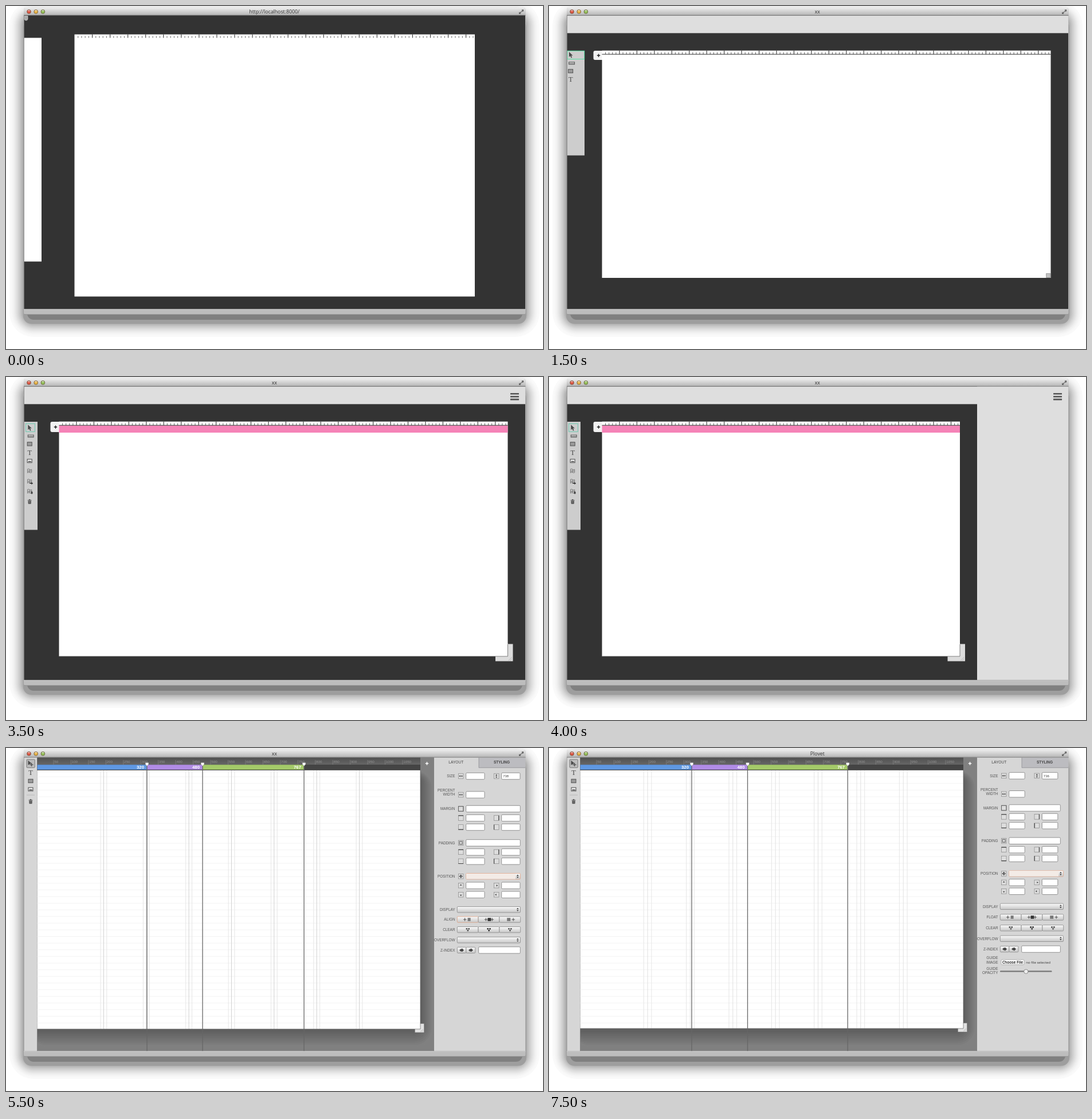
An HTML page for the animation above (8 s loop, 937 by 598 pixels).

```html
<!DOCTYPE html>
<html lang="en">
<head>
<meta charset="utf-8">
<title>Layout editor history</title>
<style>
html, body { margin: 0; width: 100%; height: 100%; overflow: hidden; background: #fff; }
svg { display: block; width: 937px; height: 598px; font-family: "Liberation Sans", Arial, sans-serif; }
.title { font-family: "Open Sans", "Noto Sans", sans-serif; }
.serif { font-family: "Liberation Serif", "Noto Serif", serif; }
</style>
</head>
<body>
<svg viewBox="0 0 937 598" xmlns="http://www.w3.org/2000/svg">
  <defs>
    <linearGradient id="bar" x2="0" y2="1"><stop stop-color="#ececec"/><stop offset="1" stop-color="#b4b4b4"/></linearGradient>
    <linearGradient id="button" x2="0" y2="1"><stop stop-color="#fafafa"/><stop offset="1" stop-color="#c6c6c6"/></linearGradient>
    <linearGradient id="ruler" x2="0" y2="1"><stop stop-color="#505050"/><stop offset="1" stop-color="#666"/></linearGradient>
    <clipPath id="content"><rect x="31.5" y="16.5" width="874.5" height="512"/></clipPath>
  </defs>
  <g id="frame"></g>
  <g id="view" clip-path="url(#content)"></g>
  <g id="caption"></g>
</svg>
<script>
const STEP = 500, LOOP = 8000;
const INK = '#4a4a4a';

// Shapes are given by their edges: left, top, right, bottom.
const box = (l, t, r, b, fill, more = '') =>
  `<rect x="${l}" y="${t}" width="${r - l}" height="${b - t}" fill="${fill}" ${more}/>`;
const path = (d, fill = 'none', more = '') => `<path d="${d}" fill="${fill}" ${more}/>`;
const line = (x1, y1, x2, y2, color, width = 1) =>
  path(`M${x1} ${y1}L${x2} ${y2}`, 'none', `stroke="${color}" stroke-width="${width}"`);
const text = (x, y, s, size, fill, more = '') =>
  `<text x="${x}" y="${y}" font-size="${size}" fill="${fill}" ${more}>${s}</text>`;
const range = (n, fn) => Array.from({ length: n }, (_, i) => fn(i)).join('');
const gray = v => { v = Math.round(v); return `rgb(${v},${v},${v})`; };
const END = 'text-anchor="end"', MID = 'text-anchor="middle"';

function windowFrame() {
  const shadow = range(12, k => box(6 + 2 * k, -8 + 2 * k, 931 - 2 * k, 577 - 2 * k,
    gray(250 - 75 * (k / 11) ** 1.7), `rx="${42 - 2 * k}"`));
  const lights = ['#dd5441', '#e6b242', '#91bf56'].map((c, i) => {
    const x = 40 + 12.2 * i;
    return `<circle cx="${x}" cy="9.9" r="3.4" fill="${c}" stroke="#6b5a4a" stroke-width=".8"/>` +
      `<ellipse cx="${x}" cy="8.2" rx="1.8" ry="1" fill="#fff" opacity=".6"/>`;
  }).join('');
  return shadow + box(30, 24, 908, 554, '#9e9e9e', 'rx="14"') + box(37, 30, 901, 547, '#808080', 'rx="11"') +
    box(31, 3, 906.5, 538, '#bdbdbd', 'rx="3.5"') +
    box(31, 3, 906.5, 16.5, 'url(#bar)', 'rx="3.5"') + line(31, 16.2, 906.5, 16.2, '#666', .8) +
    line(31, 529, 906.5, 529, '#d2d2d2') + line(32, 537.8, 905.5, 537.8, '#8a8a8a', .8) + lights +
    path('M899.5 6.3H903.2V10L902 8.9L900.2 10.6L898.9 9.4L900.7 7.6ZM895 10.3L896.2 11.4L898 9.7L899.3 11L897.5 12.7L898.7 13.9H895Z', '#666');
}

const icons = {
  arrow: (x, y) => path(`M${x - 3} ${y - 5}V${y + 4}L${x - 1} ${y + 2}L${x + .8} ${y + 5.5}L${x + 2.3} ${y + 4.8}L${x + .6} ${y + 1.4}H${x + 3.6}Z`, INK),
  move: (x, y) => path(`M${x - 4} ${y - 5}V${y + 3}L${x + 1.8} ${y - .4}Z`, INK) +
    path(`M${x - 1} ${y + 2.3}H${x + 5}M${x + 2} ${y - .7}V${y + 5.3}`, 'none', `stroke="${INK}" stroke-width="1.3"`),
  ruler: (x, y) => box(x - 3, y - 2, x + 7, y + 2, '#999', `stroke="${INK}" stroke-width=".8"`) +
    range(4, i => line(x - 1 + 2 * i, y - 1.8, x - 1 + 2 * i, y, '#eee', .7)),
  rect: (x, y) => box(x - 4, y - 3.2, x + 4, y + 3.2, '#999', `stroke="${INK}" stroke-width=".9"`),
  type: (x, y) => text(x, y + 4.3, 'T', 12.5, INK, `class="serif" ${MID}`),
  image: (x, y) => box(x - 4, y - 3, x + 4, y + 3, '#eee', `stroke="${INK}" stroke-width="1"`) +
    path(`M${x - 3} ${y + 2}L${x - 1} ${y - .5}L${x + .5} ${y + 1}L${x + 2} ${y - .2}L${x + 3.3} ${y + 2}Z`, INK),
  flag: (x, y) => path(`M${x - 3.5} ${y + 3.5}V${y - 3.5}Q${x - 1.5} ${y - 4.5} ${x} ${y - 3}T${x + 3.5} ${y - 3}V${y + 2.6}Q${x + 1.8} ${y + 3.6} ${x} ${y + 2.5}T${x - 3.5} ${y + 2.5}M${x} ${y - 3}V${y + 2.5}M${x - 3.5} ${y}H${x + 3.5}`, 'none', 'stroke="#666" stroke-width=".8"'),
  flagRight: (x, y) => icons.flag(x, y) + path(`M${x} ${y + 2.6}H${x + 3}V${y + 1}L${x + 6} ${y + 3.4}L${x + 3} ${y + 5.4}V${y + 4}H${x}Z`, '#333'),
  flagDown: (x, y) => icons.flag(x, y) + path(`M${x + 3} ${y}H${x + 4.8}V${y + 2}H${x + 6}L${x + 3.9} ${y + 5}L${x + 1.8} ${y + 2}H${x + 3}Z`, '#333'),
  trash: (x, y) => path(`M${x - 3.4} ${y - 2.8}H${x - 1.2}V${y - 4}H${x + 1.2}V${y - 2.8}H${x + 3.4}V${y - 1.7}H${x - 3.4}ZM${x - 2.8} ${y - 1}H${x + 2.8}L${x + 2.4} ${y + 4}H${x - 2.4}Z`, INK) +
    range(2, i => line(x - .9 + 1.8 * i, y, x - .9 + 1.8 * i, y + 3, '#bbb', .5)),
  stack: (x, y) => path(`M${x - 3.4} ${y}L${x} ${y - 3}L${x + 3.4} ${y}ZM${x - 3} ${y + .7}H${x + 3}V${y + 2.6}H${x - 3}Z`, INK),
};
const tools = list => list.map(([name, x, y]) => icons[name](x, y)).join('');

const ticks = (left, right, top, base, step) =>
  range(Math.floor((right - left) / step * 5), i => {
    const x = (left + (i + 1) * step / 5).toFixed(2), major = i % 5 === 4;
    return line(x, major ? top : top + 3, x, base, '#333', major ? 1.1 : .8);
  });

const plus = (x, y, color) => line(x - 2.7, y, x + 2.7, y, color, 1.4) + line(x, y - 2.7, x, y + 2.7, color, 1.4);
const backdrop = color => box(31, 16, 906.5, 528.5, color);
const menu = () => range(3, i => box(880, 28 + 4.9 * i, 895, 30.6 + 4.9 * i, '#555', 'rx=".5"'));

function firstPage() {
  return backdrop('#333') + path('M32 17.5H38V23L36.5 25H33.5L32 23Z', '#aaa', 'stroke="#ddd" stroke-width=".7"') +
    box(31.5, 55.5, 62, 445.5, '#fff') + box(119.5, 49.5, 818, 506.5, '#fff') + ticks(119.5, 818, 49.5, 55.5, 31.05);
}

function plainPage(right, toolbar) {
  return backdrop('#333') + box(31.5, 47, 62, 437, toolbar ? '#cdcdcd' : '#fff') +
    (toolbar ? tools([['arrow', 37.5, 54], ['ruler', 37.7, 68], ['rect', 37.7, 81.7], ['type', 37.7, 96.3]]) : '') +
    box(92.5, 47, right, 498, '#fff') + ticks(92.5, right, 47, 53.5, 30.45) +
    (toolbar ? line(92.5, 53.7, right, 53.7, '#333') : '') +
    text(92.3, 79.6, 'Hello World', 15.8, '#222', 'font-weight="bold"');
}

const oldTools = () => box(31.5, 78, 62, 260.5, '#cdcdcd') +
  box(32, 78.3, 61.7, 92.6, 'none', 'stroke="#57e0a3" stroke-width="1"') +
  tools([['arrow', 38, 85], ['ruler', 37.7, 99.8], ['rect', 37.7, 113.5], ['type', 37.7, 128]]);

const newTools = () => box(31.5, 78, 55, 266.5, '#cdcdcd') +
  box(34.7, 81.3, 50.3, 95.3, 'none', 'stroke="#62c9ad" stroke-width=".9"') +
  tools([['arrow', 41.3, 88.2], ['ruler', 41.2, 103], ['rect', 41.2, 116.8], ['type', 41.2, 131.6], ['image', 41.2, 146.3],
    ['flag', 41.2, 164], ['flagRight', 41.2, 182], ['flagDown', 41.2, 199.5], ['trash', 41.2, 217.2]]);

function barPage({ right = 875.5, bottom, pink, handle, newBar, hasMenu, panel }) {
  const tab = box(77.5, 78, 100, newBar ? 96 : 94, '#f2f2f2', 'rx="3"') + plus(86.5, newBar ? 87.3 : 86.2, '#222');
  return backdrop('#333') + box(31.5, 16.5, 906, 47.3, '#dedede') +
    (panel ? box(747, 16.5, 906, 528.5, '#dedede') : '') + (hasMenu ? menu() : '') +
    (newBar ? newTools() : oldTools()) + tab +
    (handle === 'large' ? box(right - 21.5, bottom - 21.5, right + 9, bottom + 8.5, '#dcdcdc') +
      path(`M${right + 7.5} ${bottom + 1}L${right + 1} ${bottom + 7.5}M${right + 7.5} ${bottom + 4}L${right + 4} ${bottom + 7.5}`, 'none', 'stroke="#aaa" stroke-width=".7"') : '') +
    box(92.5, 77.7, right, bottom, '#fff') +
    (handle === 'large' ? path(`M${right} ${bottom - 21}V${bottom}H92.5`, 'none', 'stroke="#666" stroke-width=".8"') : '') +
    (pink ? box(92.5, 84.5, right, 97, '#f583b7') : '') +
    ticks(92.5, right, 77.7, 84, 30.45) + line(92.5, 84.2, right, 84.2, '#333') +
    (handle === 'small' ? box(867.7, 466.3, 874.7, 473.4, '#c2c2c2', 'stroke="#888" stroke-width=".7"') : '');
}

const PAGE = { left: 54.5, right: 723, top: 39 };

function grid(start, gap, mid, bottom) {
  const rows = Math.floor((bottom - PAGE.top) / 11.6);
  return range(rows, i => line(PAGE.left, 50.2 + 11.6 * i, PAGE.right, 50.2 + 11.6 * i, '#f2f2f2', .9)) +
    range(7, c => range(3, k => {
      const x = start + 74.35 * c + gap * k;
      return line(x, PAGE.top, x, bottom, k === 1 ? mid : '#e4e4e4', .9);
    }));
}

function pageShadow() {
  return range(9, k => box(40, 38 + k, 745 - 2.4 * k, 521 - 3.2 * k, gray(128 - 4 * k), `rx="${32 - 2 * k}"`));
}

function breakpoints(stops) {
  const colors = ['#5f98e2', '#b18ce6', '#a4ca69'], values = [320, 480, 767];
  let left = PAGE.left, out = box(left, 29, PAGE.right, 38.6, '#444');
  stops.forEach((x, i) => {
    out += box(left, 29.2, x, 38, colors[i]) + line(left, 37.6, x, 37.6, 'rgba(0,0,0,.25)', .9) +
      text(x - 5, 36.2, values[i], 7.8, '#fff', `${END} font-weight="bold"`);
    left = x;
  });
  return out + stops.map(x => line(x, 29, x, 528.5, '#666', 1.3) +
    path(`M${x - 2.8} 25.5H${x + 2.8}V28.5L${x} 31.5L${x - 2.8} 28.5Z`, '#fff', 'stroke="#777" stroke-width=".5"')).join('');
}

function editor({ bottom, start, gap, mid = '#ccc', stops, panel, toolsEnd = 528.5, last = 'trash' }) {
  const { left, right, top } = PAGE;
  return backdrop('#808080') + (stops ? pageShadow() : '') +
    box(31.5, 16.5, left, toolsEnd, '#d6d6d6') + line(left, 16.5, left, toolsEnd, '#777', .7) +
    box(36, 20, 50.3, 34.2, '#bdbdbd', 'rx="1" stroke="#777" stroke-width="1"') +
    line(36, 82, 50, 82, '#b0b0b0', .8) +
    tools([['move', 42.5, 26.8], ['type', 43, 42.7], ['rect', 43, 57.5], ['image', 43, 72], [last, 43, last === 'trash' ? 93.3 : 92.4]]) +
    box(right - 9.5, bottom - 9.5, right + 6.5, bottom + 6, '#e2e2e2', 'stroke="#777" stroke-width=".5"') +
    path(`M${right + 5} ${bottom}L${right} ${bottom + 5}M${right + 5} ${bottom + 2.5}L${right + 2.5} ${bottom + 5}`, 'none', 'stroke="#aaa" stroke-width=".6"') +
    box(left, top, right, bottom, '#fff') + grid(start, gap, mid, bottom) +
    path(`M${right} ${top}V${bottom}H${left}`, 'none', 'stroke="#666" stroke-width=".7"') +
    box(left, 16.5, right, 29.2, 'url(#ruler)') +
    range(21, i => {
      const x = 52.5 + 30.45 * (i + 1);
      return line(x, 21, x, 29, '#888', .7) + text(x + 1.3, 26.4, 50 * (i + 1), 6.2, stops ? '#949494' : '#aaa');
    }) +
    (stops ? breakpoints(stops) : box(left, 29.2, right, 38, '#8c22b6') + line(left, 38.4, right, 38.4, '#41125a')) +
    plus(734.5, 27, '#fff') + (panel || box(747, 16.5, 906, 528.5, '#dedede'));
}

const field = (l, y, r, h = 11.4, stroke = '#888') =>
  box(l, y - h / 2, r, y + h / 2, '#fff', `rx="1.5" stroke="${stroke}" stroke-width=".9"`);
const button = (l, y, r, stroke = '#888') =>
  box(l, y - 5.2, r, y + 5.2, 'url(#button)', `rx="1.5" stroke="${stroke}" stroke-width=".8"`);
const label = (y, s) => text(783.5, y + 2.3, s, 6.4, '#555', END);
const select = (l, y, stroke) => button(l, y, 897.5, stroke) +
  path(`M891 ${y - .8}L892.8 ${y - 3}L894.6 ${y - .8}ZM891 ${y + .8}L892.8 ${y + 3}L894.6 ${y + .8}Z`, '#333');
const frameIcon = (x, y, mark = '') => box(x - 4.3, y - 4.3, x + 4.3, y + 4.3, '#ddd', 'stroke="#888" stroke-width=".7"') + mark;
const arrows = (x, y, turn) => path(`M${x - 3.3} ${y}L${x - 1} ${y - 1.7}V${y + 1.7}ZM${x + 3.3} ${y}L${x + 1} ${y - 1.7}V${y + 1.7}ZM${x - 1.5} ${y - .3}H${x + 1.5}V${y + .3}H${x - 1.5}Z`, '#444', `transform="rotate(${turn} ${x} ${y})"`);
const edge = (x, y, turn) => path(`M${x - 4.3} ${y - 4.1}H${x + 4.3}`, 'none', `stroke="#444" stroke-width="1.2" transform="rotate(${turn} ${x} ${y})"`);
const nudge = (x, y, turn) => path(`M${x - 1.7} ${y}L${x} ${y - 2.5}L${x + 1.7} ${y}Z`, '#444', `transform="rotate(${turn} ${x} ${y})"`);

function panelView(p) {
  const X1 = 793.7, X2 = p.icon, pair = (y, inner, turns) =>
    frameIcon(X1, y, inner(X1, y, turns[0])) + frameIcon(X2, y, inner(X2, y, turns[1])) +
    field(802.7, y, p.short) + field(X2 + 9, y, X2 + 9 + p.short - 802.7);
  const block = (name, y, inner, main) => label(y, name) + frameIcon(X1, y, main) +
    pair(y + p.first, inner, [0, 90]) + pair(y + p.second, inner, [180, 270]);
  const ring = (y, r) => box(X1 - r, y - r, X1 + r, y + r, 'none', 'stroke="#666" stroke-width="1.1"');
  const squares = (x, y, k) => path(`M${x - 3} ${y - 2.7}h2.6v2.6h-2.6zM${x + .8} ${y - 2.7}h2.6v2.6h-2.6zM${x - 1} ${y + .4}h2.6v2.4h-2.6z`, k === 1 ? '#333' : '#555');
  const segments = (y, kind) => range(3, i => {
    const l = 787.3 + 36.8 * i, x = l + 18.3;
    const mark = kind === 'clear' ? squares(x, y, i)
      : box(x - 2 + (i < 1) * 2 - (i > 1) * 3, y - 2.8, x + 4 + (i < 1) - (i > 1) * 3, y + 2.8, i === 1 ? '#333' : '#777') +
        (i < 2 ? plus(x - 5, y, '#333').replaceAll('1.4', '.8') : '') + (i > 0 ? plus(x + 6, y, '#333').replaceAll('1.4', '.8') : '');
    return button(l, y, l + 36.8, kind === 'align' && i === 0 && p.accent ? '#dfa183' : '#888') + mark;
  });
  const diamond = (x, y) => path(`M${x - 4} ${y}l3-2.5l3 2.5l-3 2.5zM${x} ${y - 2.3}l1-.6l3 2.9l-3 2.9l-1-.6`, '#444');
  const [margin, padding, position, display, float, clear, overflow, z] = p.rows;
  return box(746.5, 16.5, 906, 528.5, '#d6d6d6') + line(746.5, 16.5, 746.5, 528.5, '#777', .8) +
    box(825, 17, 906, 34.3, '#bcbcc0') + path('M825 17V34.3H906', 'none', 'stroke="#909095" stroke-width=".8"') +
    text(785.3, 27.2, 'LAYOUT', 6.65, '#444', MID) + text(865, 27.2, 'STYLING', 6.5, '#444', `${MID} font-weight="bold"`) +
    label(p.size, 'SIZE') + frameIcon(X1, p.size, arrows(X1, p.size, 0)) + field(802.7, p.size, p.short) +
    frameIcon(X2, p.size, arrows(X2, p.size, 90)) + field(X2 + 9, p.size, X2 + 9 + p.short - 802.7) +
    text(X2 + 11.5, p.size + 2.3, p.height, 6, '#444') +
    label(p.percent - 7.5, 'PERCENT') + label(p.percent - .4, 'WIDTH') +
    frameIcon(X1, p.percent, arrows(X1, p.percent, 0)) + field(802.7, p.percent, p.short) +
    block('MARGIN', margin, edge, ring(margin, 4.2)) + field(802.7, margin, p.wide) +
    block('PADDING', padding, edge, ring(padding, 2.4)) + field(802.7, padding, p.wide) +
    block('POSITION', position, nudge, arrows(X1, position, 0) + arrows(X1, position, 90)) +
    select(802.7, position, '#e2a78b') + box(803.2, position - 4.7, 889, position + 4.7, '#f3ebe6') +
    label(display, 'DISPLAY') + select(787.3, display) +
    label(float, p.accent ? 'ALIGN' : 'FLOAT') + segments(float, 'align') +
    label(clear, 'CLEAR') + segments(clear, 'clear') +
    label(overflow, 'OVERFLOW') + select(787.3, overflow) +
    label(z, 'Z-INDEX') + button(787.3, z, 802.8) + button(802.8, z, 818.8) + diamond(795, z) + diamond(811, z) +
    field(824.7, z, p.wide) + (p.guide ? guide() : '');
}

function guide() {
  return label(366, 'GUIDE') + label(373.2, 'IMAGE') + label(384.8, 'GUIDE') + label(392, 'OPACITY') +
    box(789, 369, 829, 377.8, '#fafafa', 'rx="1.5" stroke="#999" stroke-width=".7"') +
    text(809, 375.8, 'Choose File', 6.6, '#111', `class="title" ${MID} font-weight="600"`) +
    text(832.3, 375.7, 'no file selected', 6.1, '#333', 'class="title"') +
    box(787, 388.2, 877.5, 390.6, '#777', 'rx="1.2"') +
    '<circle cx="832.3" cy="389.7" r="3.7" fill="#eee" stroke="#777" stroke-width=".8"/>';
}

const widePanel = () => panelView({ size: 49, percent: 81.5, icon: 855.7, short: 835, wide: 897.3, first: 16, second: 32, height: 738,
  rows: [106, 165.4, 223.7, 281.7, 299, 316.7, 334.7, 352.4], accent: true });
const narrowPanel = () => panelView({ size: 48.4, percent: 80.2, icon: 851.3, short: 830.2, wide: 892.3, first: 15.4, second: 30.8, height: 736,
  rows: [104.5, 161.8, 219, 276.3, 295, 313.8, 332.3, 350.6], guide: true });

const bare = barPage({ bottom: 474, handle: 'small' });
const striped = barPage({ bottom: 487, pink: true, handle: 'large', newBar: true, hasMenu: true });
const early = { bottom: 467.5, start: 166.6, gap: 1.6 };
const mature = { bottom: 490, start: 165, gap: 5.4, stops: [246, 343, 520], panel: widePanel() };
const finished = editor({ bottom: 489, start: 165.3, gap: 6.8, mid: '#dedede', stops: [249, 346.5, 521.2], panel: narrowPanel() });
const late = editor({ ...mature, toolsEnd: 521, last: 'stack' });

const scenes = [
  firstPage(), plainPage(790, false), plainPage(875.5, true), bare, bare, bare,
  barPage({ bottom: 474, pink: true, handle: 'small', hasMenu: true }), striped,
  barPage({ right: 717, bottom: 487, pink: true, handle: 'large', newBar: true, hasMenu: true, panel: true }),
  editor(early), editor({ ...early, panel: widePanel() }), editor(mature), editor(mature),
  late, finished, finished,
];
const titleAt = i => i === 0 ? 'http://localhost:8000/' : i < 14 ? 'xx' : 'Plovet';

const part = id => document.getElementById(id);
part('frame').innerHTML = windowFrame();
let shown = -1;

function draw(time) {
  const index = Math.floor(time % LOOP / STEP);
  if (index === shown) return;
  shown = index;
  part('view').innerHTML = scenes[index];
  part('caption').innerHTML = text(468.3, 13, titleAt(index), 8.75, '#333', `class="title" ${MID}`);
}

const begin = performance.now();
function tick() {
  draw(performance.now() - begin);
  requestAnimationFrame(tick);
}
tick();
</script>
</body>
</html>
```
